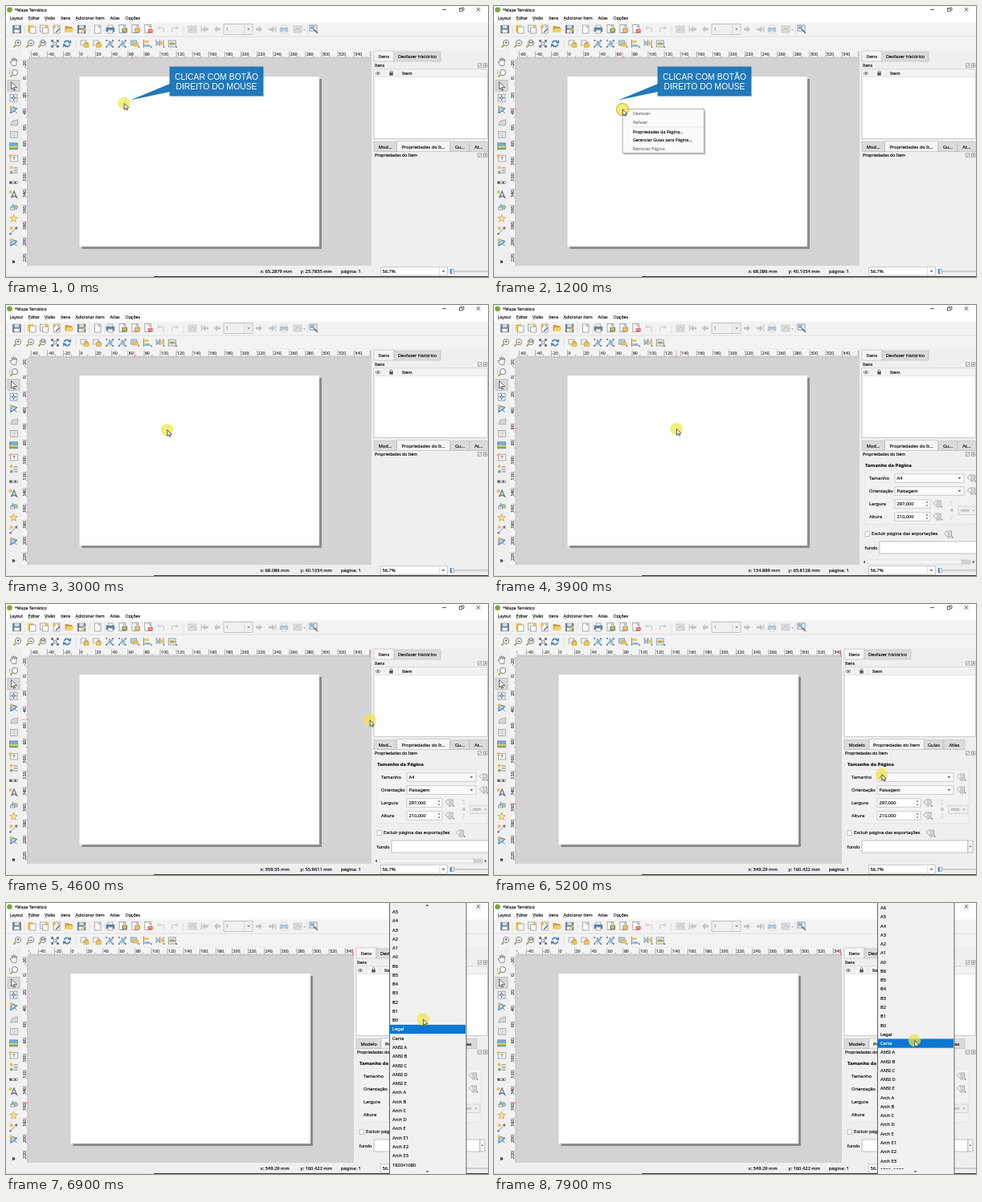
Recreate the animation shown at these times as an HTML page with a canvas. Size 600x338 px, loop 8000 ms.

```html
<!DOCTYPE html>
<html lang="pt">
<head>
<meta charset="utf-8">
<title>Mapa Temático</title>
<style>
html, body { margin: 0; width: 100%; height: 100%; overflow: hidden; background: #f0f0f0; }
canvas { display: block; }
</style>
</head>
<body>
<canvas id="stage" width="600" height="338"></canvas>
<script>
const g = document.getElementById('stage').getContext('2d');
const LOOP = 8000, MM = 1.005, ROW = 11.27, TOP = 88;
const MENU = '"Open Sans", sans-serif', FORM = '"Noto Sans", "Open Sans", sans-serif';
const BG = '#f0eff0', LINE = '#b8b8b8', INK = '#0c0c0c', DIM = '#808080';
const BLUE = '#4a86b4', PALE = '#b9d2e6', GOLD = '#eec64c', SLATE = '#5f7182';

const clamp = v => Math.max(0, Math.min(1, v));
const ease = v => { v = clamp(v); return v * v * (3 - 2 * v); };
const mix = (a, b, p) => a + (b - a) * p;

// drawing helpers
function rect(x, y, w, h, fill, stroke, lw = 0.7) {
  if (fill) { g.fillStyle = fill; g.fillRect(x, y, w, h); }
  if (stroke) { g.strokeStyle = stroke; g.lineWidth = lw; g.strokeRect(x, y, w, h); }
}
function trace(pts) {
  g.beginPath();
  for (let i = 0; i < pts.length; i += 2) g.lineTo(pts[i], pts[i + 1]);
}
function line(color, w, ...pts) {
  trace(pts); g.strokeStyle = color; g.lineWidth = w; g.stroke();
}
function poly(fill, ...pts) {
  trace(pts); g.closePath(); g.fillStyle = fill; g.fill();
}
function circle(x, y, r, fill, stroke, lw = 1) {
  g.beginPath(); g.arc(x, y, r, 0, 7);
  if (fill) { g.fillStyle = fill; g.fill(); }
  if (stroke) { g.strokeStyle = stroke; g.lineWidth = lw; g.stroke(); }
}
// the hairline stroke gives small type the weight of hinted screen text
function text(s, x, y, size = 5.7, color = INK, align = 'left', style = '', font = FORM) {
  g.font = `${style} ${size}px ${font}`;
  g.textAlign = align; g.fillStyle = g.strokeStyle = color; g.lineWidth = 0.16;
  g.fillText(s, x, y + size * 0.35);
  g.strokeText(s, x, y + size * 0.35);
}
const menuText = (s, x, y, size = 5.3, color = INK) => text(s, x, y, size, color, 'left', '', MENU);
const down = (x, y, c = '#555', r = 1.8) => poly(c, x - r, y - r / 2, x + r, y - r / 2, x, y + r / 2 + 0.4);
const up = (x, y, c = '#555', r = 1.8) => poly(c, x - r, y + r / 2, x + r, y + r / 2, x, y - r / 2 - 0.4);
const spark = (x, y) => circle(x, y, 1.7, GOLD, '#c79d35', 0.4);
function inside(x, y, w, h, draw) {
  g.save(); g.beginPath(); g.rect(x, y, w, h); g.clip(); draw(); g.restore();
}

// icons, centred on x, y
const icon = {
  save(x, y) {
    rect(x - 4.8, y - 4.8, 9.6, 9.6, '#71879b', '#4f6375');
    rect(x - 2.8, y - 4.8, 5.6, 3.6, '#d5dde4'); rect(x - 3.2, y + 0.6, 6.4, 3.8, '#f4f6f8');
  },
  page(x, y) {
    rect(x - 3.8, y - 5, 7.8, 10, '#fcfcfc', '#888');
    poly('#aaa', x + 1, y - 5, x + 4, y - 2, x + 1, y - 2);
  },
  fresh(x, y) { rect(x - 5, y - 5, 7, 9, GOLD); rect(x - 2.5, y - 3, 7.5, 8, '#fcfcfc', '#888'); },
  copy(x, y) { rect(x - 5, y - 5, 7, 8, '#fcfcfc', '#888'); rect(x - 2, y - 2, 7, 7, '#fcfcfc', '#888'); spark(x + 3.5, y - 3.5); },
  tool(x, y) { icon.page(x, y); line(SLATE, 1.4, x - 1, y + 4, x + 4, y - 1); spark(x - 3, y - 3); },
  folder(x, y) {
    poly('#c9a040', x - 5, y - 4, x - 1, y - 4, x, y - 3, x + 4, y - 3, x + 4, y + 4, x - 5, y + 4);
    poly('#f3d06a', x - 3, y - 1, x + 6, y - 1, x + 4, y + 4, x - 5, y + 4);
  },
  saveAs(x, y) { icon.save(x, y); line(GOLD, 1.8, x, y + 4, x + 5, y - 1); },
  print(x, y) {
    rect(x - 3, y - 5, 6, 4, '#fff', '#888');
    rect(x - 5, y - 2, 10, 5, '#5f86ad', '#486a8a', 0.5); rect(x - 3, y + 1, 6, 4, '#fff', '#888');
  },
  image(x, y) { icon.page(x - 1, y - 0.5); rect(x - 1, y - 1, 6, 5, '#79b06f', '#666', 0.5); spark(x + 2, y + 1); },
  vector(x, y) { icon.page(x - 1, y - 0.5); rect(x - 1, y - 1, 6, 5, '#f0c05c', '#866', 0.5); },
  pdf(x, y) { icon.page(x - 1, y - 0.5); rect(x - 1, y, 6, 4.5, '#d9635b'); line('#fff', 0.8, x, y + 3, x + 2, y + 1, x + 4, y + 3); },
  undo(x, y, d = 1) {
    g.beginPath(); g.arc(x, y + 1, 3, d > 0 ? 3.6 : 5.8, d > 0 ? 1 : 2.2, d < 0);
    g.strokeStyle = '#d4d4d4'; g.lineWidth = 1.4; g.stroke();
    poly('#d0d0d0', x - 5 * d, y, x - 4 * d, y - 4, x - 0.5 * d, y - 1);
  },
  redo(x, y) { icon.undo(x, y, -1); },
  atlas(x, y) { rect(x - 5, y - 4, 10, 8, '#dedede', '#c0c0c0'); line('#b8b8b8', 1, x - 3, y + 2, x, y - 2, x + 4, y + 2); },
  arrow(x, y, d = 1, bar = 0) {
    poly('#c4c4c4', x + 4 * d, y, x, y - 4, x, y - 1.5, x - 4 * d, y - 1.5, x - 4 * d, y + 1.5, x, y + 1.5, x, y + 4);
    if (bar) line('#c4c4c4', 1.2, x + 4.8 * d, y - 4, x + 4.8 * d, y + 4);
  },
  grayPrint(x, y) { g.globalAlpha = 0.35; icon.print(x, y); g.globalAlpha = 1; },
  gear(x, y) { rect(x - 5, y - 5, 9, 7, '#fff', '#667'); rect(x - 4, y - 4, 5, 4, '#8fb4d3'); line('#667', 1.5, x, y, x + 5, y + 5); },
  zoom(x, y, s = '') {
    line('#b39a4c', 2, x - 2, y + 2, x - 4.6, y + 4.6);
    circle(x + 1, y - 1, 3.6, '#f8fafb', '#6d7478', 0.9);
    text(s, x + 1, y - 1, s.length > 1 ? 3.6 : 6, '#333', 'center', 'bold');
  },
  full(x, y) {
    for (const a of [-1, 1]) for (const b of [-1, 1]) rect(x + a * 3.4 - 1.4, y + b * 3.4 - 1.4, 2.8, 2.8, SLATE);
    line(SLATE, 1, x - 3, y - 3, x + 3, y + 3); line(SLATE, 1, x + 3, y - 3, x - 3, y + 3);
    circle(x, y, 2, '#eef2f5', '#667', 0.7);
  },
  refresh(x, y) {
    for (const a of [0.3, 3.44]) {
      g.beginPath(); g.arc(x, y, 3.6, a, a + 2.3);
      g.strokeStyle = BLUE; g.lineWidth = 1.9; g.stroke();
    }
    poly(BLUE, x + 5, y - 5, x + 5, y, x + 1, y - 1); poly(BLUE, x - 5, y + 5, x - 5, y, x - 1, y + 1);
  },
  lock(x, y) {
    rect(x - 5, y - 4, 7, 6, '#eceeef', '#999');
    circle(x + 2, y, 1.9, null, '#a88a36', 0.9); rect(x - 1, y, 6, 4.5, GOLD, '#b8923a', 0.5);
  },
  group(x, y) {
    poly(PALE, x - 4, y + 3, x - 1, y - 4, x + 4, y - 3, x + 3, y + 4);
    line('#6b8ba5', 0.8, x - 4, y + 3, x + 4, y - 3); line('#6b8ba5', 0.8, x - 1, y - 4, x + 3, y + 4);
    for (const a of [-1, 1]) for (const b of [-1, 1]) rect(x + a * 4 - 0.9, y + b * 4 - 0.9, 1.8, 1.8, SLATE);
  },
  raise(x, y) { rect(x - 5, y - 4, 7, 6, PALE, '#6b8ba5'); rect(x - 2, y - 1, 6, 4, GOLD, '#b8923a', 0.5); down(x + 5, y + 4.2, '#444', 1.2); },
  align(x, y) { line('#777', 0.9, x - 4.5, y - 5, x - 4.5, y + 5); rect(x - 3.5, y - 4, 5, 3, GOLD); rect(x - 3.5, y + 1, 7, 3, '#94b8d4'); down(x + 5, y + 4.2, '#444', 1.2); },
  spread(x, y) { for (const d of [-4.5, 0, 4.5]) line('#777', 0.8, x + d, y - 5, x + d, y + 3); rect(x - 3.5, y - 3, 2.6, 5, '#94b8d4'); rect(x + 1, y - 3, 2.6, 5, GOLD); down(x + 5, y + 4.2, '#444', 1.2); },
  resize(x, y) { rect(x - 5, y - 4, 9, 8, '#dfeaf2', '#6b8ba5'); rect(x - 3, y - 2, 5, 4, GOLD); line(SLATE, 0.8, x - 4, y, x + 4, y); down(x + 5, y + 4.2, '#444', 1.2); },
  hand(x, y) {
    const pts = [-1.5, 5, -4.5, 0, -2.5, 0.5, -2, -4, -0.7, -1, 0, -5, 1, -1, 2, -4.5, 2.6, -1, 4, -3, 3, 5, -1.5, 5]
      .map((v, i) => v + (i % 2 ? y : x));
    poly('#fff', ...pts); line('#666', 0.7, ...pts);
  },
  lens(x, y) { icon.zoom(x + 0.5, y - 0.5); line('#888', 0.6, x - 5, y - 4, x - 5, y + 1); },
  select(x, y) {
    rect(x - 7.5, y - 7, 15, 14, '#d8d7d8', '#b5b5b5');
    poly('#fff', x - 3, y - 5, x + 4, y + 2, x - 3, y + 3);
    line('#444', 0.8, x - 3, y - 5, x + 4, y + 2, x, y + 2, x + 2, y + 5, x, y + 5.5, x - 1, y + 3, x - 3, y + 4, x - 3, y - 5);
  },
  move(x, y) {
    rect(x - 4.5, y - 4.5, 9, 9, '#e6eef4', '#7d8d9b');
    line(SLATE, 1, x - 3.6, y, x + 3.6, y); line(SLATE, 1, x, y - 3.6, x, y + 3.6);
    rect(x - 1.2, y - 1.2, 2.4, 2.4, '#fff', SLATE, 0.6);
  },
  nodes(x, y) {
    poly(PALE, x - 4, y + 4, x - 3, y - 4, x + 4, y - 2, x + 1, y + 1);
    line(BLUE, 1.1, x - 4, y + 4, x - 3, y - 4, x + 4, y - 2, x + 1, y + 1, x - 4, y + 4);
    line(SLATE, 1, x + 1, y + 1, x + 4, y + 4); spark(x - 3, y - 3.6);
  },
  terrain(x, y) { poly('#d4d8d8', x - 4, y + 4, x - 2, y - 1, x + 5, y - 3, x + 5, y + 4); line('#999', 0.7, x - 4, y + 4, x - 2, y - 1, x + 5, y - 3, x + 5, y + 4, x - 4, y + 4); },
  map(x, y) { rect(x - 4, y - 3.5, 9, 8, '#e3e5e5', '#999'); line('#b5b5b5', 0.8, x + 0.5, y - 3, x + 0.5, y + 4); },
  picture(x, y) { rect(x - 5, y - 4, 10, 8, '#6fb0dd', '#5b7f98'); rect(x - 5, y, 10, 2, '#f0cd55'); rect(x - 5, y + 2, 10, 2, '#7da864'); },
  label(x, y) { rect(x - 4, y - 3.5, 9, 7.5, '#fff', '#888'); text('T', x + 0.5, y, 5.4, '#444', 'center'); spark(x - 4, y - 3); },
  legend(x, y) { spark(x - 3, y - 3.4); rect(x - 4.5, y + 1, 3.4, 3.4, '#86ab6e'); for (const d of [-3, 0, 3]) line('#777', 0.9, x, y + d, x + 5, y + d); },
  scale(x, y) { rect(x - 5, y - 1, 10, 2.4, '#fff', '#666', 0.6); rect(x - 5, y - 1, 3, 2.4, '#555'); rect(x + 1, y - 1, 2, 2.4, '#555'); },
  north(x, y) { line(SLATE, 1.2, x - 3, y + 4, x + 0.5, y - 4, x + 4, y + 4, x + 0.5, y + 1.6, x - 3, y + 4); spark(x - 4, y - 3); },
  shape(x, y) { poly('#8db4cf', x - 4, y + 2, x - 1, y - 4, x + 2, y + 2); circle(x + 2.4, y + 1, 2.6, '#a9c893', '#7d9470', 0.6); rect(x - 4, y + 1, 5, 3, '#d5e2ea', '#789', 0.6); },
  star(x, y) {
    const pts = [];
    for (let i = 0; i < 11; i++) {
      const a = i * Math.PI / 5 - Math.PI / 2, r = i % 2 ? 2.2 : 5;
      pts.push(x + r * Math.cos(a), y + r * Math.sin(a));
    }
    poly('#f9e08a', ...pts); line('#c0a04a', 0.7, ...pts);
  },
  stroke(x, y) { line('#888', 0.9, x - 4, y + 4, x + 3, y - 3); circle(x - 4, y + 4, 1.2, SLATE); poly(SLATE, x + 5, y - 5, x + 4, y - 1, x + 1, y - 4); spark(x - 3, y - 3); },
  override(x, y) {
    const pts = [-5.5, -1, -2.6, -4, 3.6, -4, 3.6, 2.2, -2.6, 2.2, -5.5, -1].map((v, i) => v + (i % 2 ? y : x));
    poly('#fafafa', ...pts); line('#808080', 0.7, ...pts);
    line('#777', 0.7, x - 2, y - 2, x + 2.6, y - 2); line('#777', 0.7, x - 2, y + 0.2, x + 2.6, y + 0.2);
    line('#888', 0.7, x - 2, y + 4, x + 2.5, y + 4); down(x + 4.6, y + 3.8, '#444', 1.2);
  }
};
const row = (names, x, y, dx, dy) => names.split(' ').forEach((n, i) => icon[n](x + i * dx, y + i * dy));

function chrome() {
  rect(0, 0, 600, 338, BG);
  rect(0, 20.5, 600, 34, '#f4f3f4');
  rect(0, 0, 600, 20.5, '#fff');
  circle(4.5, 4.8, 3.3, '#7da63c');
  menuText('*Mapa Temático', 11, 5, 5.2);
  line('#333', 0.8, 543, 4.5, 548, 4.5);
  rect(564.5, 3.5, 3.6, 3.4, null, '#333'); line('#333', 0.7, 566, 3, 566, 2, 570, 2, 570, 5.5, 568.5, 5.5);
  line('#333', 0.8, 585.7, 2, 590.3, 6.8); line('#333', 0.8, 590.3, 2, 585.7, 6.8);
  [['Layout', 4.5], ['Editar', 27.7], ['Visão', 48], ['Itens', 68.2], ['Adicionar Item', 86.6], ['Atlas', 129.6], ['Opções', 148.5]].forEach(([s, x], i) => {
    menuText(s, x, 15);
    if (i < 5) line('#444', 0.5, x, 18.2, x + g.measureText(s[0]).width, 18.2);
  });
  line('#dcdcdc', 0.8, 0, 38, 600, 38);
  icon.save(13.5, 29);
  row('fresh copy tool folder saveAs', 32, 29, 15.5, 0);
  row('page print image vector pdf undo redo', 114, 29, 15.9, 0);
  for (const x of [23, 104, 123, 221, 375]) line('#d6d6d6', 0.7, x, 24, x, 35);
  icon.atlas(232, 29); icon.arrow(248, 29, -1, 1); icon.arrow(263, 29, -1);
  rect(271, 22.5, 36, 13, '#f0f0f0', '#b4b4b4'); text('1', 273.5, 29, 5.7, '#8a8a8a');
  line('#ccc', 0.6, 297, 23, 297, 35); down(302, 29, '#888');
  icon.arrow(315, 29); icon.arrow(331, 29, 1, 1);
  icon.grayPrint(346, 29); icon.atlas(363, 29); down(371.5, 30, '#999', 1.3); icon.gear(383, 29);
  icon.zoom(14, 47, '+'); icon.zoom(30, 47, '–'); icon.zoom(45, 47, '1:1');
  row('full refresh', 61, 47, 15, 0);
  row('lock lock group group raise align spread resize', 98, 47, 15.6, 0);
  line('#d6d6d6', 0.7, 87, 42, 87, 53);
  row('hand lens select move nodes terrain map picture label legend scale north shape star stroke nodes', 9.5, 69.5, 0, 15.05);
  text('»', 9.5, 319, 6.4, INK, 'center', 'bold');
}

function canvasArea(edge, ox, mx, my) {
  rect(20, 55.5, edge - 20, 268.5, '#f5f4f5');
  rect(28, 65.5, edge - 28, 258.5, '#d4d2d4');
  inside(28, 55.5, edge - 28, 10.5, () => {
    for (let m = -70; m < 380; m += 2) {
      const x = ox + m * MM, big = m % 20 === 0;
      line('#777', 0.6, x, 65.8, x, big ? 56.5 : m % 10 ? 63.4 : 61.8);
      if (big) text(String(m), x + 1, 60.3, 5.2, '#3a3a3a');
    }
    line('rgba(224,48,48,.6)', 0.7, ox + mx * MM, 57, ox + mx * MM, 65.5);
  });
  inside(20, 66, 8.2, 258, () => {
    for (let m = -24; m < 240; m += 2) {
      const y = TOP + m * MM, big = m % 20 === 0;
      line('#777', 0.6, big ? 20.5 : m % 10 ? 26 : 24.5, y, 28.2, y);
      if (!big) continue;
      g.save(); g.translate(22.8, y + 1); g.rotate(-Math.PI / 2);
      text(String(m), 0, 0, 5.2, '#3a3a3a', 'right');
      g.restore();
    }
    line('rgba(224,48,48,.6)', 0.7, 20, TOP + my * MM, 28, TOP + my * MM);
  });
  const w = 297 * MM, h = 210 * MM + 1;
  rect(ox + 3, TOP + 3, w, h, '#8c8b8c');
  rect(ox, TOP, w, h, '#fff');
}

function tab(s, x, w, y, on) {
  rect(x, on ? y - 1 : y, w, on ? 13 : 12, on ? '#f6f5f6' : '#dcdbdc', LINE, 0.6);
  text(s, x + w / 2, y + 6, 5.7, INK, 'center');
}
function dockTitle(s, x, y) {
  text(s, x, y, 5.2);
  for (const cx of [589.8, 596.8]) rect(cx - 2.2, y - 2.2, 4.4, 4.4, '#fafafa', '#777', 0.6);
  line('#555', 0.7, 588.6, y + 1.2, 591, y - 1.2);
  line('#555', 0.7, 595.6, y - 1.2, 598, y + 1.2); line('#555', 0.7, 598, y - 1.2, 595.6, y + 1.2);
}

function panel(edge, p, form) {
  const s = edge - 455;
  rect(edge, 55.5, 600 - edge, 268.5, BG);
  tab('Itens', 458 + s, 25, 57, true);
  tab('Desfazer histórico', 483 + s, 58, 57);
  dockTitle('Itens', 459 + s, 74);
  rect(458 + s, 79, 141.5 - s, 86.5, '#fff', LINE);
  rect(458.4 + s, 79.4, 140.7 - s, 8.8, '#f3f3f3'); line('#ccc', 0.6, 458 + s, 88.4, 599, 88.4);
  g.beginPath(); g.ellipse(463 + s, 84, 3, 1.7, 0, 0, 7); g.strokeStyle = '#777'; g.lineWidth = 0.7; g.stroke();
  circle(463 + s, 84, 1.1, '#555');
  circle(479.5 + s, 82.4, 1.5, null, '#666', 0.8); rect(477.3 + s, 83, 4.4, 3.6, '#555');
  text('Item', 493 + s, 84);
  for (const x of [471, 488]) line('#ddd', 0.6, x + s, 80, x + s, 88);

  const wide = p > 0.9;
  const tabs = wide ? [['Modelo', 436, 31], ['Guias', 535, 25], ['Atlas', 560, 26], ['Propriedades do Item', 467, 68]]
    : [['Mod...', 458, 28], ['Gu...', 553, 24], ['At...', 577, 23], ['Propriedades do It...', 486.5, 66]];
  tabs.forEach(([n, x, w], i) => tab(n, x, w, 169.7, i === 3));
  dockTitle('Propriedades do Item', 459 + s, 186);
  if (form) pageForm(s, p);
}

function pageForm(s, p) {
  const right = mix(585, 572, p), ov = mix(595, 582, p), spin = mix(543, 531, p);
  text('Tamanho da Página', 462 + s, 199.7, 5.9, INK, 'left', 'bold');
  rect(462 + s, 206.5, 600 - 462 - s - 9 * p, 67, '#f3f2f3', '#e0e0e0', 0.6);
  [['Tamanho', 'A4', 216], ['Orientação', 'Paisagem', 232]].forEach(([a, b, y]) => {
    text(a, 467 + s, y);
    rect(499 + s, y - 5.2, right - 499 - s, 10.4, '#fafafa', LINE);
    text(b, 501.5 + s, y); down(right - 5.5, y);
    icon.override(ov, y);
  });
  [['Largura', '297,000', 248], ['Altura', '210,000', 264]].forEach(([a, b, y]) => {
    text(a, 467 + s, y);
    rect(499 + s, y - 5.2, spin - 499 - s, 10.4, '#fff', LINE);
    text(b, 501.5 + s, y);
    up(spin - 4, y - 2.2, '#555', 1.4); down(spin - 4, y + 2.2, '#555', 1.4);
    line('#ddd', 0.5, spin - 8, y - 5, spin - 8, y + 5);
    icon.override(spin + 9.5, y);
  });
  const cx = mix(569, 557, p);
  line('#ccc', 0.8, cx - 2, 245, cx + 1, 245, cx + 1, 251);
  line('#ccc', 0.8, cx - 2, 267, cx + 1, 267, cx + 1, 261);
  rect(cx - 1, 254, 4, 4, '#ccc');
  const ux = mix(578, 566, p);
  rect(ux, 251, 24, 10.4, '#eee', '#c8c8c8'); text('mm', ux + 3, 256.3, 5.7, '#999'); down(ux + 19, 256.3, '#999', 1.4);
  rect(462 + s, 282.8, 5.6, 5.6, '#fff', '#aaa'); text('Excluir página das exportações', 470 + s, 285.5);
  icon.override(566 + s, 286);
  text('fundo', 461.5 + s, 302.7);
  const end = mix(602, 590, p);
  rect(480 + s, 295, end - 480 - s, 15, '#fff', '#aaa');
  if (p > 0.5) { rect(590, 295, 6, 15, '#f4f4f4', '#aaa'); down(593, 302.5, '#444', 1.3); }
  if (p < 0.9) {
    rect(458 + s, 317.8, 142 - s, 5.6, BG);
    rect(582, 318, 11, 5, '#d2d2d2', '#bbb', 0.5);
    rect(465 + s, 318, 117 - s, 5, '#f6f6f6', '#c8c8c8', 0.5);
    poly('#555', 459.5 + s, 320.5, 462 + s, 318.8, 462 + s, 322.2); poly('#555', 598.5, 320.5, 596, 318.8, 596, 322.2);
  }
}

function statusBar(mx, my) {
  const num = v => Number(v.toPrecision(6));
  rect(0, 324, 600, 14, BG);
  text(`x: ${num(mx)} mm`, 316.5, 331, 5.75);
  text(`y: ${num(my)} mm`, 366.5, 331, 5.75);
  text('página: 1', 417, 331, 5.75);
  rect(466.5, 325.5, 83, 10.5, '#fff', LINE); text('56.7%', 468.5, 331, 5.75);
  line('#ccc', 0.6, 539.5, 326, 539.5, 336); down(544.5, 331);
  rect(557, 330.2, 42, 1.6, '#dedede', '#b4b4b4', 0.5);
  rect(553, 328.4, 4.6, 5.2, '#f8fafc', '#7d98b0'); rect(553, 328.4, 1.8, 5.2, BLUE);
  line('#dedede', 1, 0, 337.5, 184, 337.5); line('#333', 1, 184, 337.5, 600, 337.5);
}

function callout(alpha) {
  g.globalAlpha = alpha;
  poly('#2279ba', 154.5, 117.5, 204, 97, 204, 107);
  rect(203.5, 75.5, 117, 37, '#2279ba');
  g.font = '10.35px "Liberation Sans", Arial, sans-serif';
  g.textAlign = 'center'; g.fillStyle = '#fff';
  g.fillText('CLICAR COM BOTÃO', 262, 91.7);
  g.fillText('DIREITO DO MOUSE', 262, 103.9);
  g.globalAlpha = 1;
}

function contextMenu(hot) {
  rect(162, 130.5, 101.5, 55, 'rgba(0,0,0,.22)');
  rect(160, 128.5, 101.5, 55, '#fbfbfb', '#909090');
  if (hot) rect(161.5, 151.5, 98.5, 10.5, '#91c9f7');
  [['Desfazer', 134, DIM], ['Refazer', 145, DIM], ['Propriedades da Página...', 156.7, INK],
   ['Gerenciar Guias para Página...', 167.5, INK], ['Remover Página', 178.5, DIM]]
    .forEach(([s, y, c]) => menuText(s, 173, y, 5.25, c));
  line('#d8d8d8', 0.7, 171, 150.8, 260, 150.8);
}

const span = (n, list) => list.split('').map(c => n + c);
const SIZES = [...span('A', '6543210'), ...span('B', '6543210'), 'Legal', 'Carta',
  ...span('ANSI ', 'ABCDE'), ...span('Arch ', 'ABCDE'), ...span('Arch E', '123'), '1920×1080'];

function sizeList(t) {
  const scrolled = t < 7750, base = scrolled ? -0.3 : 6;
  const hot = t < 5800 ? 2 : Math.round((pointer(t - 25)[1] - base) / ROW);
  rect(477.5, -1, 95.5, 340, '#f1f1f1', '#555', 0.9);
  inside(478, scrolled ? 6 : 0, 94.5, scrolled ? 326 : 332, () => SIZES.forEach((s, i) => {
    const y = base + i * ROW;
    if (i === hot) rect(478, y - ROW / 2, 94, ROW, '#0a78d0');
    text(s, 481, y, 5.7, i === hot ? '#fff' : INK);
  }));
  if (scrolled) up(524.5, 2.8, '#333', 1.7);
  down(524.5, 335, '#333', 1.7);
}

// pointer path: time, x, y
const PATH = [
  [0, 147, 121], [80, 147, 121], [400, 160, 128.5], [1300, 160, 128.5], [1800, 200.5, 155.3],
  [3750, 200.5, 155.3], [4500, 452.8, 144.3], [4680, 452.8, 144.3], [4900, 431.6, 200],
  [5000, 431.6, 249.2], [5180, 482.5, 212], [5800, 482.5, 212], [6200, 512, 205],
  [6700, 512, 205], [7100, 526, 85], [7600, 526, 85], [7850, 523.5, 171], [8000, 523.5, 171]
];
function pointer(t) {
  let i = 1;
  while (i < PATH.length - 1 && t > PATH[i][0]) i++;
  const [a, b] = [PATH[i - 1], PATH[i]], p = ease((t - a[0]) / (b[0] - a[0]));
  return [mix(a[1], b[1], p), mix(a[2], b[2], p)];
}
function drawPointer(x, y, pressed) {
  circle(x, y + 0.5, 7.7, 'rgba(238,230,70,.72)', pressed && 'rgba(190,150,40,.6)', 1.2);
  const pts = [0, 0, 0, 7.6, 1.8, 6, 3, 8.6, 4.2, 8, 3.1, 5.6, 5.5, 5.4, 0, 0];
  const at = pts.map((v, i) => v + (i % 2 ? y + 0.5 : x + 0.3));
  poly('#fff', ...at); line('#333', 0.8, ...at);
}

// last place over the page, in millimetres
function readout(t, x, y) {
  if (t >= 5000) return [349.29, 160.422];
  if (t >= 4500) return [359.55, 55.9611];
  if (t >= 3800) return [(x - 91.5) / MM, (y - TOP) / MM];
  const p = ease((t - 80) / 320);
  return [mix(65.2879, 68.086, p), mix(23.7835, 40.1054, p)];
}

function draw(t) {
  const [x, y] = pointer(t), [mx, my] = readout(t, x, y);
  const p = ease((t - 4680) / 220), edge = mix(455, 433, p);
  chrome();
  canvasArea(edge, 91.5 - 11 * p, mx, my);
  panel(edge, p, t >= 3100);
  statusBar(mx, my);
  if (t < 1600) callout(1 - clamp((t - 1300) / 300));
  if (t >= 700 && t < 1950) contextMenu(y > 151);
  if (t >= 5700) sizeList(t);
  drawPointer(x, y, (t >= 600 && t < 1300) || (t >= 1850 && t < 1950));
}

const start = performance.now();
function tick() {
  draw((performance.now() - start) % LOOP);
  requestAnimationFrame(tick);
}
tick();
</script>
</body>
</html>
```
